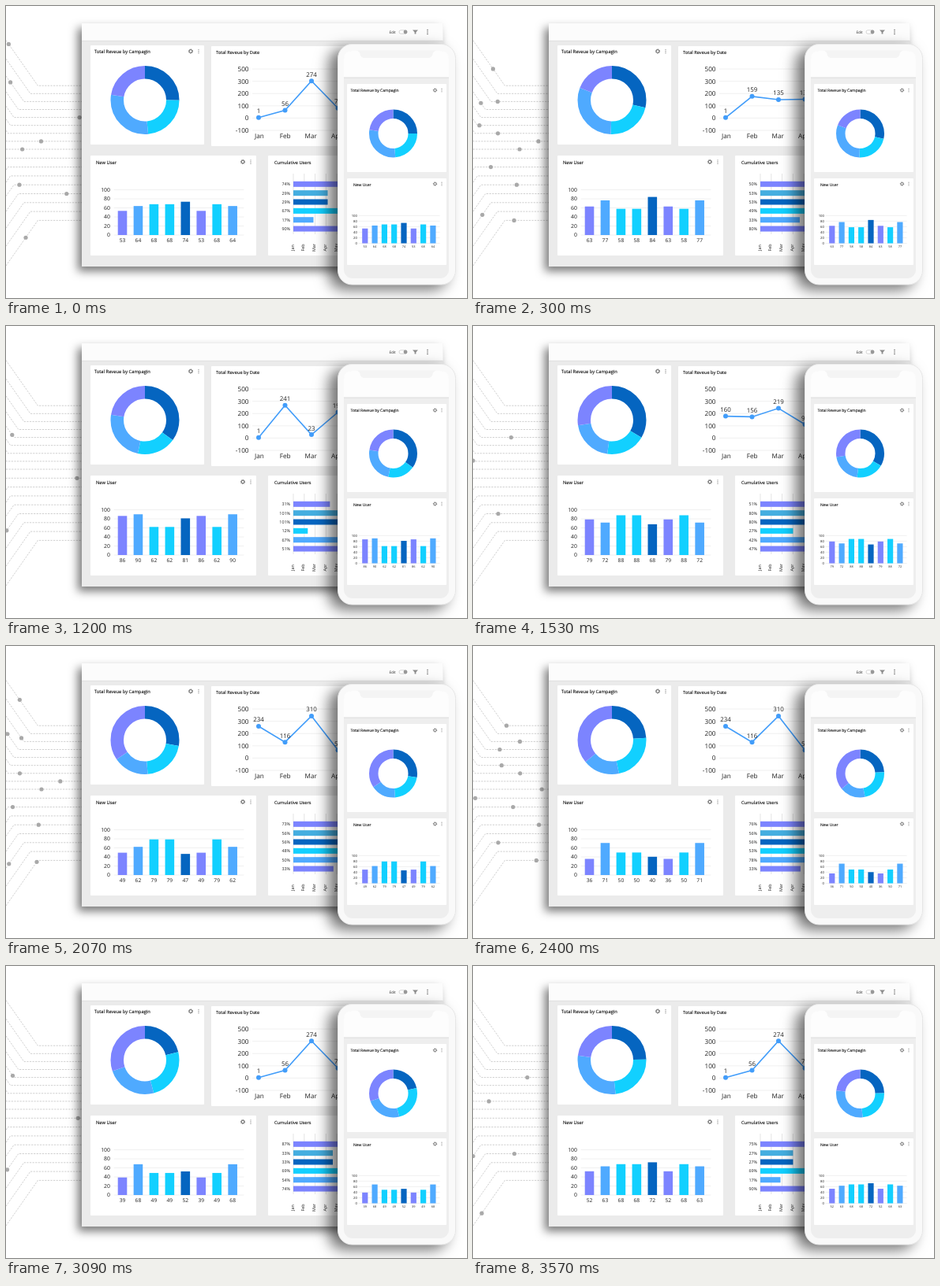
An HTML page for the animation above (3600 ms loop, 584 px wide and 371 px high).

```html
<!DOCTYPE html>
<html lang="en">
<head>
<meta charset="utf-8">
<title>Dashboard</title>
<style>
html, body { margin: 0; width: 100%; height: 100%; overflow: hidden; background: #fff; }
svg { display: block; width: 584px; height: 371px; font-family: "Open Sans", "Noto Sans", sans-serif; fill: #222; text-rendering: geometricPrecision; }
.board { filter: drop-shadow(-5px 6px 6px rgba(0, 0, 0, .52)); }
.phone { filter: drop-shadow(-11px 6px 9px rgba(0, 0, 0, .55)); }
.title { fill: #111; stroke: #111; stroke-width: .12px; }
.mid { text-anchor: middle; }
.end { text-anchor: end; }
.wire { fill: none; stroke: #c9c9c9; stroke-width: .9; stroke-dasharray: 2.2 1.4; }
.dot { fill: #a9a9a9; }
.grid { stroke: #ececec; stroke-width: .8; }
</style>
</head>
<body>
<svg id="stage" viewBox="0 0 584 371"></svg>
<script>
const NAVY = '#0565c0', CYAN = '#12d0ff', SKY = '#4faaff', PURPLE = '#7c84ff', TEAL = '#45aee0', BLUE = '#429dfa';
const MONTHS = ['Jan', 'Feb', 'Mar', 'Apr', 'May'];
const LOOP = 3600;
const stage = document.getElementById('stage');

function set(el, attrs) {
  for (const k in attrs) el.setAttribute(k, attrs[k]);
}
function add(parent, tag, attrs, text) {
  const el = document.createElementNS('http://www.w3.org/2000/svg', tag);
  set(el, attrs);
  if (text !== undefined) el.textContent = text;
  parent.appendChild(el);
  return el;
}
const rect = (p, x, y, width, height, fill, more) =>
  add(p, 'rect', { x, y, width, height, fill, ...more });
const circle = (p, cx, cy, r, fill, more) =>
  add(p, 'circle', { cx, cy, r, fill, ...more });
const label = (p, x, y, size, text, cls = '') =>
  add(p, 'text', { x, y, 'font-size': size, class: cls }, text);
const line = (p, x1, y1, x2, y2, stroke = '#ececec') =>
  add(p, 'line', { x1, y1, x2, y2, class: 'grid', style: `stroke:${stroke}` });

// A value that swings once and twice per loop, each swing peaking at an angle
const cos = deg => Math.cos(deg * Math.PI / 180);
const wave = (mean, amp, peak, amp2 = 0, peak2 = 0) => t => {
  const a = t / LOOP * 360;
  return mean + amp * cos(a - peak) + amp2 * cos(2 * (a - peak2));
};
const climb = wave(62, 32, 123, 16, 89);

const SERIES = [
  { fill: PURPLE, value: wave(58.5, 26, 103, 4, 140) },
  { fill: SKY, value: wave(75, 12, 85, 12, 88) },
  { fill: CYAN, value: wave(60, 13, 165, 21, 175) },
  { fill: NAVY, value: wave(65, 25, 70) }
];
const ORDER = [0, 1, 2, 2, 3, 0, 2, 1];
const ROWS = [
  { fill: PURPLE, value: wave(60, 30, 278, 10, 170) },
  { fill: TEAL, value: climb },
  { fill: NAVY, value: climb },
  { fill: CYAN, value: wave(44, 27, 300, 10) },
  { fill: SKY, value: wave(54, 10, 200, 28, 87) },
  { fill: PURPLE, value: wave(58, 25, 10, 9, 160) }
];
// Where each ring slice ends, in percent
const CUTS = [
  { fill: NAVY, value: wave(28, 7, 115) },
  { fill: CYAN, value: wave(49.5, 4, 105) },
  { fill: SKY, value: wave(73, 9, 60) },
  { fill: PURPLE, value: () => 100 }
];

// Line chart: three states, an eased move and then a rest
const STATES = [[1, 56, 274, 72], [1, 241, 23, 190], [234, 116, 310, 57]];
function trend(t) {
  const span = LOOP / STATES.length, k = Math.floor(t / span);
  const u = Math.min(1, (t - k * span) / 580);
  const p = u < .5 ? 4 * u ** 3 : 1 - 4 * (1 - u) ** 3;
  const next = STATES[(k + 1) % STATES.length];
  return STATES[k].map((v, i) => v + (next[i] - v) * p);
}

// Wires fan out from the middle one; a null entry time means no dot
const ENTRIES = [-45, null, -75, 165, 1095, 205, 40, -350, -160, 495, 110, null, -190, 1190, 140, null, -340];
const DOT_CYCLE = 1880, DOT_SPEED = .128;
const dots = [];
ENTRIES.forEach((entry, i) => {
  const j = i - 8, y = 182 + j * (j < 0 ? 10.1 : 11.3);
  const rise = .9 * j * j;
  const path = add(stage, 'path', { d: `M0 ${y + Math.sign(j) * rise}L${rise * .7} ${y}H98`, class: 'wire' });
  if (entry !== null)
    dots.push({ path, entry, len: path.getTotalLength(), el: add(stage, 'circle', { r: 2.6, class: 'dot' }) });
});

function card(p, x, y, w, h, text, tx, ty, size) {
  rect(p, x, y, w, h, '#fff', { rx: 1 });
  label(p, tx, ty, size, text, 'title');
}
function tools(p, x, y, s) {
  const ring = { stroke: '#666', 'stroke-width': s };
  circle(p, x, y, 1.9 * s, 'none', ring);
  circle(p, x, y, 2.6 * s, 'none', { ...ring, 'stroke-dasharray': '1 1.04' });
  for (const d of [-2.2, 0, 2.2]) circle(p, x + 10 * s, y + d * s, .65 * s, '#888');
}
function donut(p, cx, cy, r, width) {
  return CUTS.map(c => circle(p, cx, cy, r, 'none', {
    stroke: c.fill, 'stroke-width': width, pathLength: 100, transform: `rotate(-90 ${cx} ${cy})`
  }));
}
function columns(p, o) {
  for (let v = 0; v <= 100; v += 20) {
    const y = o.base - v * o.unit;
    line(p, o.x - 5, y, o.x + o.pitch * 8, y);
    label(p, o.axis, y + o.size * .3, o.size, v, 'end');
  }
  return ORDER.map((k, i) => {
    const x = o.x + i * o.pitch, { fill, value } = SERIES[k];
    return {
      o, value,
      bar: rect(p, x, 0, o.w, 0, fill),
      text: label(p, x + o.w / 2, o.base + o.drop, o.font, '', 'mid')
    };
  });
}

// Tablet
const board = add(stage, 'g', { class: 'board' });
rect(board, 96, 22, 457.5, 309, '#ebebeb');
rect(board, 96, 22, 457.5, 22, '#fcfcfc');
line(board, 96, 44.3, 553, 44.3, '#dcdcdc');
label(board, 485.5, 34.6, 4.6, 'Edit');
rect(board, 498, 30.8, 10, 4.4, '#fff', { rx: 2.2, stroke: '#bbb', 'stroke-width': .6 });
circle(board, 506, 33, 2.4, '#999');
add(board, 'path', { d: 'M515 30.5H522L519.4 33.3V35.5H517.6V33.3Z', fill: '#8c8c8c' });
for (const y of [30.5, 33, 35.5]) circle(board, 534, y, .8, '#666');

card(board, 107, 50, 144, 126, 'Total Reveue by Campagin', 112, 60, 5.8);
card(board, 260, 51, 283, 127, 'Total Reveue by Date', 266, 61, 5.7);
card(board, 107, 190, 210, 127, 'New User', 114, 201, 5.8);
card(board, 332, 190, 211, 127, 'Cumulative Users', 340, 201, 5.7);
tools(board, 234, 57.5, 1);
tools(board, 300, 198, 1);

const rings = [donut(board, 176, 119.5, 35.25, 16.5)];
const charts = columns(board, { x: 141.7, pitch: 19.95, w: 11.6, base: 291, unit: .575, axis: 132, size: 6.9, drop: 9, font: 6.7 });

[500, 300, 200, 100, 0, -100].forEach((v, i) => {
  const y = 80 + i * 15.6;
  line(board, 312, y, 430, y);
  label(board, 307.5, y + 2.9, 8.2, v, 'end');
});
const curve = add(board, 'polyline', { fill: 'none', stroke: BLUE, 'stroke-width': 1.6 });
const marks = STATES[0].map((_, i) => {
  const x = 320 + i * 33.5;
  label(board, 321 + i * 32.6, 167.5, 8.2, MONTHS[i], 'mid');
  return { x, dot: circle(board, x, 0, 3, BLUE), text: label(board, x, 0, 7.9, '', 'mid') };
});

MONTHS.forEach((m, i) => {
  const x = 364 + i * 13.8;
  line(board, x, 213, x, 290, '#ddd');
  set(label(board, x + .5, 307, 5.4, m, 'mid'), { transform: `rotate(-90 ${x + .5} 307)` });
});
const rows = ROWS.map(({ fill, value }, i) => {
  const y = 226.3 + i * 11.35;
  return { value, bar: rect(board, 364, y - 3.5, 0, 7, fill), text: label(board, 360, y + 2, 5.4, '', 'end') };
});

// Phone
const phone = add(stage, 'g', { class: 'phone' });
rect(phone, 420.5, 48.5, 149, 305.5, '#f9f9f9', { rx: 18, stroke: '#e6e6e6' });
rect(phone, 428, 57, 133, 289, '#eeeeee', { rx: 11 });
add(phone, 'path', { d: 'M428 91V68Q428 57 439 57H550Q561 57 561 68V91Z', fill: '#fdfdfd' });
add(phone, 'path', { d: 'M443 56.5Q448 57 448.5 61Q449 66 455 66H534Q540 66 540.5 61Q541 57 546 56.5Z', fill: '#f4f4f4' });
line(phone, 428, 91, 561, 91, '#d5d5d5');
card(phone, 432, 99, 126, 112, 'Total Reveue by Campagin', 436.5, 109, 5);
card(phone, 432, 219, 126, 110, 'New User', 440, 228.5, 5);
tools(phone, 543.5, 107, .85);
tools(phone, 543.5, 226, .85);
rings.push(donut(phone, 490.5, 162, 24.75, 11.5));
charts.push(...columns(phone, { x: 451.2, pitch: 12.3, w: 7.2, base: 301.5, unit: .352, axis: 445, size: 4.3, drop: 5.6, font: 3.9 }));

function draw(t) {
  for (const d of dots) {
    const s = ((t - d.entry + DOT_CYCLE) % DOT_CYCLE) * DOT_SPEED;
    const p = d.path.getPointAtLength(Math.min(s, d.len));
    set(d.el, { cx: p.x, cy: p.y, visibility: s > d.len ? 'hidden' : 'visible' });
  }

  const cuts = [0, ...CUTS.map(c => c.value(t))];
  for (const ring of rings)
    ring.forEach((el, i) => set(el, {
      'stroke-dasharray': `${cuts[i + 1] - cuts[i]} 100`,
      'stroke-dashoffset': -cuts[i]
    }));

  for (const { o, value, bar, text } of charts) {
    const v = value(t), height = v * o.unit;
    set(bar, { y: o.base - height, height });
    text.textContent = Math.round(v);
  }

  for (const { value, bar, text } of rows) {
    const v = value(t);
    set(bar, { width: v * 1.52 });
    text.textContent = Math.round(v) + '%';
  }

  const points = trend(t).map((v, i) => {
    const { x, dot, text } = marks[i], y = 142 - v * .171;
    set(dot, { cy: y });
    set(text, { y: y - 5.5 });
    text.textContent = Math.round(v);
    return x + ',' + y;
  });
  set(curve, { points: points.join(' ') });
}

function tick() {
  draw(performance.now() % LOOP);
  requestAnimationFrame(tick);
}
tick();
</script>
</body>
</html>
```
